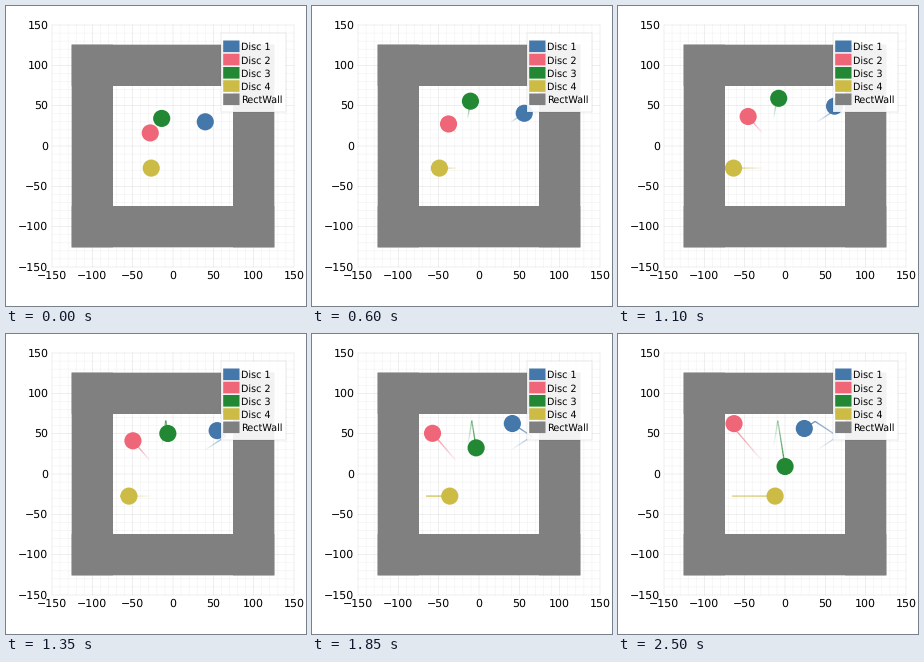
Recreate the animation shown at these times as a matplotlib script. Size 300x300 px, loop 2.55 s.

```python
import numpy as np
import matplotlib.pyplot as plt
from matplotlib.animation import FuncAnimation
from matplotlib.collections import LineCollection
from matplotlib.colors import to_rgb
from matplotlib.patches import Circle, Rectangle

SIZE, DPI = 300, 100
FRAMES, STEP = 51, 50
PX = 72 / DPI            # one pixel in points
SCALE = 242 / 300        # pixels per data unit
LIMIT = 65               # wall distance minus disc radius
GRAY = "#808080"

plt.rcParams.update({"font.family": "DejaVu Sans", "text.hinting": "none",
                     "path.snap": False})

# colour, start position, velocity per frame
DISCS = [
    ("#4477AA", (40.0, 30.0), (1.34, 0.88)),
    ("#EE6677", (-28.2, 16.2), (-0.795, 0.925)),
    ("#228833", (-14.0, 34.2), (0.282, 1.78)),
    ("#CCBB44", (-27.0, -27.4), (-1.84, 0.0)),
]


def to_px(x, y):
    return 167 + SCALE * x, 140 - SCALE * y


def simulate(start, velocity):
    """Step a disc, turning it around once it has touched a wall."""
    pos, vel = np.array(start), np.array(velocity)
    path = []
    for _ in range(FRAMES):
        path.append(to_px(*pos))
        hit = (np.abs(pos) >= LIMIT) & (pos * vel > 0)
        vel = np.where(hit, -vel, vel)
        pos = pos + vel
    return np.array(path)


fig = plt.figure(figsize=(SIZE / DPI, SIZE / DPI), dpi=DPI, facecolor="white")
ax = fig.add_axes([0, 0, 1, 1])
ax.set_xlim(0, SIZE)
ax.set_ylim(SIZE, 0)
ax.axis("off")


def add_rect(x, y, w, h, **style):
    ax.add_patch(Rectangle((x, y), w, h, snap=False, **style))


def draw_grid():
    left, top = to_px(-150, 150)
    right, bottom = to_px(150, -150)
    for v in range(-150, 151, 10):
        x, y = to_px(v, v)
        major = v % 50 == 0
        style = dict(color="black", lw=0.6 * PX, zorder=0, snap=False,
                     alpha=0.1 if major else 0.05)
        ax.plot([x, x], [top, bottom], **style)
        ax.plot([left, right], [y, y], **style)
        if major:
            label = str(v).replace("-", "\u2212")
            font = dict(fontsize=11 * PX, color="black")
            ax.text(x, 270, label, ha="center", va="center", **font)
            ax.text(42.5, y + 0.4, label, ha="right", va="center", **font)


def draw_walls():
    for x, y, w, h in [(-125, 125, 50, 250), (75, 125, 50, 250),
                       (-125, 125, 250, 50), (-125, -75, 250, 50)]:
        left, top = to_px(x, y)
        # half of a one pixel outline on each side
        add_rect(left - 0.5, top - 0.5, w * SCALE + 1, h * SCALE + 1,
                 fc=GRAY, lw=0, zorder=4)


def draw_legend():
    add_rect(215, 27, 65, 79, fc=(1, 1, 1, 0.9), ec=(0, 0, 0, 0.08), lw=PX,
             zorder=5)
    names = [f"Disc {i + 1}" for i in range(4)] + ["RectWall"]
    colors = [d[0] for d in DISCS] + [GRAY]
    for i, (name, color) in enumerate(zip(names, colors)):
        y = 40.3 + 13.25 * i
        add_rect(217.2, y - 5.8, 16.3, 11.6, fc=color, lw=0, zorder=6)
        ax.text(235, y + 4, name, fontsize=9.6 * PX, va="baseline",
                color="black", zorder=6)


draw_grid()
draw_walls()
draw_legend()

paths, trails, discs = [], [], []
for color, start, velocity in DISCS:
    paths.append(simulate(start, velocity))
    trails.append(ax.add_collection(
        LineCollection([], zorder=2, capstyle="butt", snap=False,
                       linewidths=1.25 * PX), autolim=False))
    discs.append(ax.add_patch(Circle(paths[-1][0], 8.57, fc=color, lw=0,
                                     zorder=3)))


def update(n):
    fade = np.linspace(0, 1, n + 1)[1:]
    for (color, _, _), path, trail, disc in zip(DISCS, paths, trails, discs):
        disc.center = path[n]
        trail.set_segments(list(np.stack([path[:n], path[1:n + 1]], axis=1)))
        if n:
            trail.set_color([(*to_rgb(color), a) for a in fade])
    return trails + discs


anim = FuncAnimation(fig, update, frames=FRAMES, interval=STEP, repeat=True,
                     repeat_delay=0, init_func=lambda: update(0))
plt.show()
```
